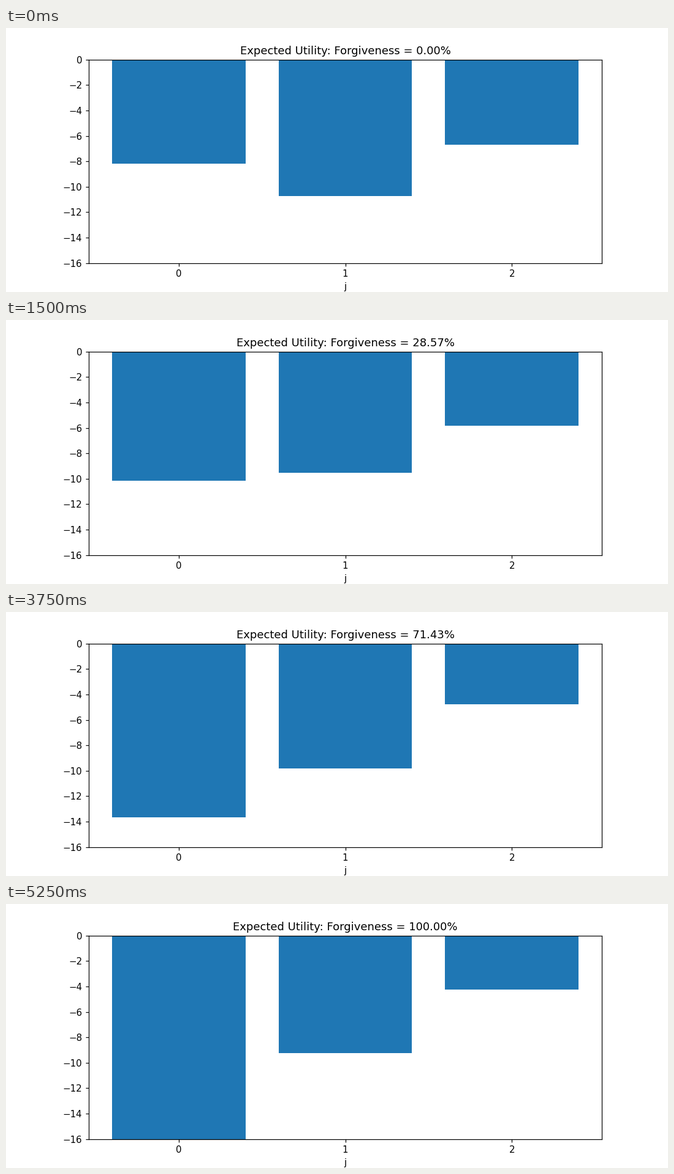
Recreate the animation shown at these times as a matplotlib script. Size 1080 by 432 pixels, loop 6 s.

```python
import numpy as np
import matplotlib.pyplot as plt
from matplotlib.animation import FuncAnimation

STEPS = 8
INTERVAL = 750  # ms per step

# Turning points of each bar's depth: {step: depth}, linear in between
DEPTH_KEYS = [
    {0: 8.16, 1: 9.35, 4: 11.74, 5: 13.66, 6: 16},
    {0: 10.75, 1: 10.80, 2: 9.51, 4: 10.65, 5: 9.82, 7: 9.25},
    {0: 6.70, 1: 5.87, 2: 5.82, 4: 4.99, 7: 4.26},
]


def utility(keys, step):
    return -np.interp(step, list(keys), list(keys.values()))


plt.rcParams["font.family"] = "DejaVu Sans"
fig, ax = plt.subplots(figsize=(10, 4), dpi=108)
fig.subplots_adjust(left=0.125, right=0.9, bottom=0.1098, top=0.88)
bars = ax.bar(range(3), [0] * 3, width=0.8015, color="#1f77b4")
ax.set_xlim(-0.54, 2.54)
ax.set_ylim(-16, 0)
ax.set_xticks(range(3))
ax.set_yticks(range(-16, 1, 2))
ax.set_xlabel("j")
title = ax.set_title("")


def update(step):
    for bar, keys in zip(bars, DEPTH_KEYS):
        bar.set_height(utility(keys, step))
    title.set_text(f"Expected Utility: Forgiveness = {step / (STEPS - 1):.2%}")
    return [*bars, title]


anim = FuncAnimation(fig, update, frames=STEPS, init_func=lambda: update(0),
                     interval=INTERVAL, repeat=True, repeat_delay=0, blit=False)
plt.show()
```
